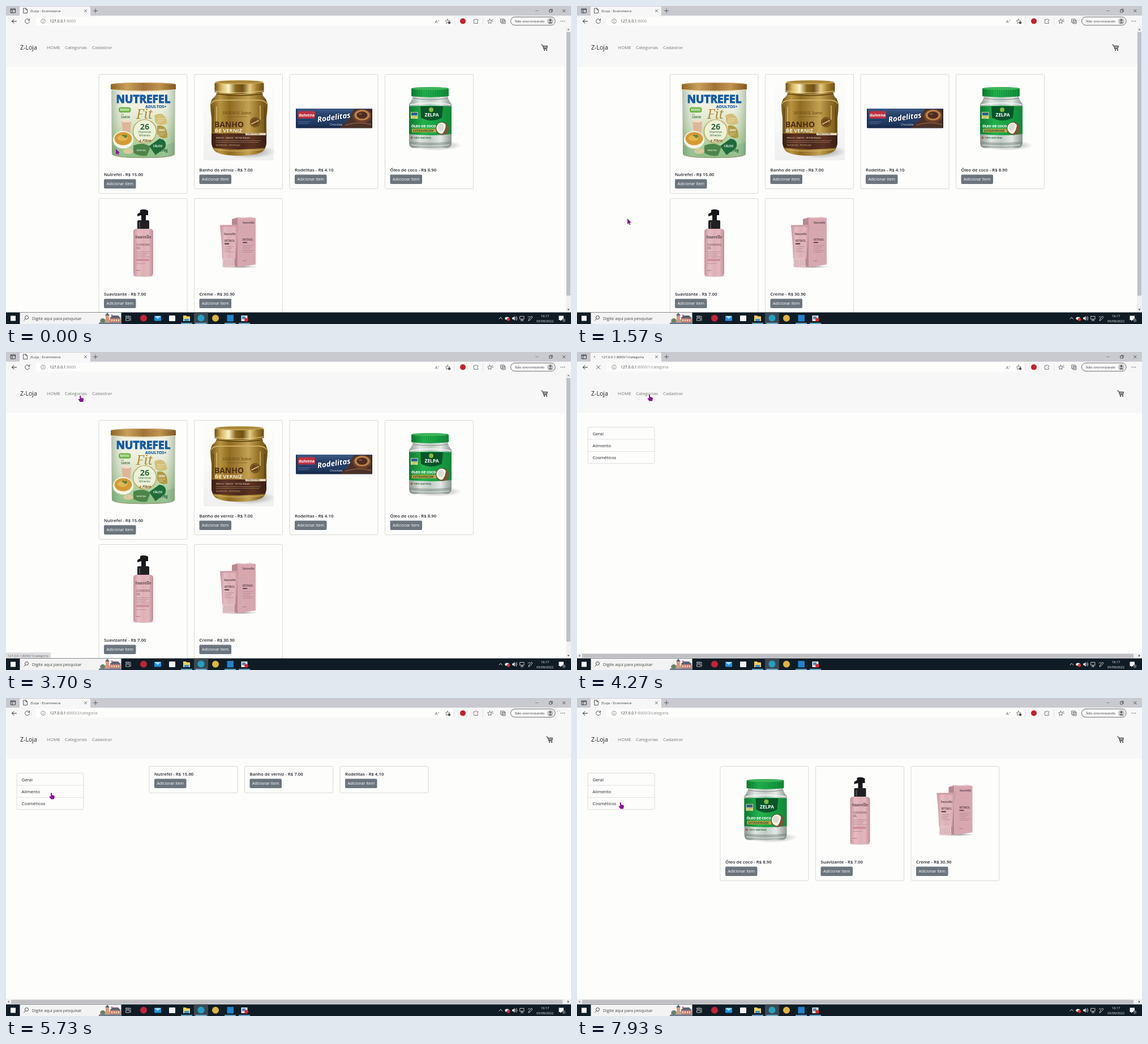
Write an HTML page that moves like this. It is 998 by 561 pixels and loops after 8 s.

```html
<!DOCTYPE html>
<html lang="pt-BR">
<head>
<meta charset="utf-8">
<title>Z-Loja</title>
<style>
html, body { margin: 0; width: 100%; height: 100%; overflow: hidden; background: #fdfdfc; }
svg { display: block; width: 998px; height: 561px; }
text { font-family: 'Open Sans', 'Noto Sans', sans-serif; }
.serif { font-family: 'Noto Serif', serif; }
</style>
</head>
<body>
<svg id="stage" viewBox="0 0 998 561"></svg>
<script>
const stage = document.getElementById('stage');

// Markup helpers
const rect = (x, y, w, h, fill, more = '') => `<rect x="${x}" y="${y}" width="${w}" height="${h}" fill="${fill}" ${more}/>`;
const circle = (x, y, r, fill, more = '') => `<circle cx="${x}" cy="${y}" r="${r}" fill="${fill}" ${more}/>`;
const oval = (x, y, rx, ry, fill, more = '') => `<ellipse cx="${x}" cy="${y}" rx="${rx}" ry="${ry}" fill="${fill}" ${more}/>`;
const shape = (d, fill, more = '') => `<path d="${d}" fill="${fill}" ${more}/>`;
const line = (d, color = '#333', w = 0.8) => `<path d="${d}" fill="none" stroke="${color}" stroke-width="${w}" stroke-linecap="round" stroke-linejoin="round"/>`;
const text = (x, y, s, size, fill = '#212529', more = '') => `<text x="${x}" y="${y}" font-size="${size}" fill="${fill}" ${more}>${s}</text>`;
const group = (content, more = '') => `<g ${more}>${content}</g>`;
const move = (x, y) => `transform="translate(${x} ${y})"`;
const bold = 'font-weight="700"';
const semi = 'font-weight="600"';
const mid = 'text-anchor="middle"';
const serif = 'class="serif"';

function gradient(id, colors, vertical) {
  const stops = colors.map((c, i) => `<stop offset="${i / (colors.length - 1)}" stop-color="${c}"/>`).join('');
  return `<linearGradient id="${id}" x2="${vertical ? 0 : 1}" y2="${vertical ? 1 : 0}">${stops}</linearGradient>`;
}

const defs = `<defs>
  ${gradient('lid', ['#8f6426', '#c9a05a', '#a0733a', '#c09350', '#81581f'])}
  ${gradient('label', ['#f3f2e6', '#f1f1e2', '#dbe6c8', '#b4d3a2', '#9cc78f'], true)}
  ${gradient('round', ['#4f7a5566', '#ffffff00', '#ffffff00', '#ffffff00', '#4f7a5566'])}
  ${gradient('gold', ['#6f5315', '#b8933f', '#8f6c22', '#a8843a', '#c3a253', '#977428', '#6a4d14'])}
  ${gradient('shine', ['#6b4d14', '#d9bb66', '#fbf2c4', '#8a671d', '#6f5016', '#e6cd86', '#a17c2c', '#6b4d14'])}
  ${gradient('band', ['#3c1f14', '#5e3423', '#4a281b', '#5b3221', '#381d13'])}
  ${gradient('backdrop', ['#fdfdfc', '#f9f9f9', '#efefef'], true)}
  ${gradient('glass', ['#8d9893', '#dfe5e1', '#c2cbc6', '#e4e9e5', '#8b9690'])}
  ${gradient('leaf', ['#0c7a30', '#22b04c', '#17a043', '#0f8a38'])}
  ${gradient('pink', ['#c9939c', '#e6bcc2', '#ddb0b7', '#e2b7bd', '#c48d97'])}
  ${gradient('roll', ['#3d5a86', '#274269', '#243d66', '#152849'], true)}
  <radialGradient id="soft"><stop stop-color="#555" stop-opacity=".7"/><stop offset="1" stop-color="#777" stop-opacity="0"/></radialGradient>
</defs>`;

// Thin strokes standing for unreadable label copy
const copy = (x, y, n, w, color, gap = 3) =>
  Array.from({ length: n }, (_, i) => rect(x, y + i * gap, w - (i % 3) * 3, 0.8, color, 'opacity=".55"')).join('');

function can() {
  const body = 'M186 146H299L298 260Q296 268 243 268T187 260Z';
  return shape(body, 'url(#label)')
    + shape('M187 245Q215 254 243 252T298 240V260Q296 268 243 268T187 260Z', '#86b982', 'opacity=".6"')
    + shape(body, 'url(#round)')
    + line('M187.5 261Q190 267.5 243 267.5T297.5 261', '#9a9a78', 1.3)
    + shape('M185 139Q186 135 243 135T300 139V147Q243 152 185 147Z', 'url(#lid)')
    + line('M186 137.5Q243 133.5 299 137.5', '#d8b778') + line('M186 148Q243 153 299 148', '#e9d9ac', 1.2)
    + text(242.5, 170.5, 'NUTREFEL', 19, '#135ba5', `${bold} ${mid} stroke="#135ba5" stroke-width="1.1"`)
    + text(246, 180, 'ADULTOS+', 7.2, '#135ba5', `${bold} stroke="#135ba5" stroke-width=".2"`)
    + rect(199, 178.5, 21.5, 9.5, '#70b548', 'rx="4"') + text(209.7, 185.3, 'NOVO', 5.4, '#fff', `${bold} ${mid}`)
    + text(203, 193, 'EM', 3.6, '#69806a') + text(203, 198, 'SABOR', 4.8, '#4e7355', bold)
    + text(230, 199, 'Fit', 23, '#b58b36', `${serif} font-style="italic"`)
    + shape('M204 203H221L219 229H207Z', '#dfb59a') + oval(212.5, 203, 8.5, 2.3, '#f1ddc7')
    + shape('M262 193Q281 183 285 207Q273 213 264 206Z', '#d3c078')
    + copy(267, 198, 3, 14, '#fff')
    + shape('M267 211Q286 208 285 232Q275 236 267 226Z', '#b39a45')
    + text(275, 221, 'ZERO', 4.4, '#fff', `${bold} ${mid}`) + copy(269, 224, 2, 12, '#fff')
    + shape('M253 247L271 234Q286 236 281 250L264 263Z', '#1f6b3a')
    + text(268, 249, 'CÁLCIO', 4.5, '#fff', `${bold} ${mid}`)
    + shape('M225 246Q244 239 255 249L249 264Q235 266 225 259Z', '#4c8449')
    + text(239, 256, 'MINERAL', 4, '#fff', mid)
    + oval(207, 236, 18, 15.5, '#f8f5e8') + oval(207, 234, 15.5, 11.5, '#d59a35') + oval(206, 233, 9, 5, '#e3b555')
    + circle(211, 230, 2.8, '#4e8d37') + circle(207, 228.5, 1.6, '#3f7a2e') + oval(216, 256, 9, 5, '#d9ca9c')
    + circle(245, 221, 20.5, '#edf1d8', 'stroke="#b89a45" stroke-width="1.2"')
    + text(245, 217.5, '26', 14.5, '#27673d', `${bold} ${mid}`)
    + text(245, 224, 'Vitaminas', 5, '#27673d', mid) + text(245, 230, 'Minerais', 5, '#27673d', mid)
    + text(246, 240, 'e Fibra', 6.4, '#765723', `${bold} ${mid} font-style="italic"`)
    + text(271, 257, '370g', 6.4, '#245f39', bold);
}

function jar() {
  return rect(349, 121, 124, 151, 'url(#backdrop)')
    + oval(430, 257, 46, 12, 'url(#soft)')
    + shape('M373 152H452Q453 159 459 164L462 173Q462 185 460 198V238Q460 251 454 256Q443 264 411 264T369 256Q363 250 363 238V198Q361 185 361 173L364 164Q371 159 373 152Z', 'url(#gold)')
    + line('M362 173Q366 166 376 166H446Q457 166 461 173', '#d8bc74', 1.3)
    + line('M366 180V222M457 180V222', '#5e4412', 1.6)
    + line('M372 178V222M449 176V200', '#dcc17b', 1.4)
    + shape('M368.5 136Q411 129 455.5 136V152Q411 158 368.5 152Z', 'url(#shine)')
    + oval(412, 134.5, 43, 3.6, '#c0a052') + oval(412, 133.8, 38, 2.2, '#a98535')
    + line('M369 150Q411 156 455 150', '#f0deA0', 0.9) + line('M372 155Q412 161 453 155', '#5a4110', 1.6)
    + text(408, 191, 'DORAVE lume', 7.6, '#6b4c18', `${serif} ${mid}`)
    + copy(391, 195, 1, 35, '#644312')
    + circle(440, 205, 9, '#6b461b') + circle(440, 205, 7, 'none', 'stroke="#b58f45" stroke-width=".6"') + line('M434 208L446 202', '#dfc787', 1.5)
    + text(368, 214, 'BANHO', 14, '#4d2d16', bold)
    + text(368.5, 223.3, 'DE VERNIZ', 9.4, '#f5edda', bold)
    + shape('M363 225H460V240Q460 246 457 250Q411 256 366 250Q363 246 363 240Z', 'url(#band)')
    + rect(423, 224, 36, 4, '#e4d7b7') + text(425, 227.3, 'UMA COR VIVA', 3.3, '#55351e')
    + text(371, 234, 'BRILHO · MACIEZ · RESTAURAÇÃO', 3.9, '#eedfc0')
    + copy(370, 237, 2, 80, '#cbb38d') + text(371, 247, 'NUTRITIVO · PROTEÇÃO', 3.9, '#cbb38d')
    + line('M368 253Q411 259 455 253', '#d4b66b', 1.2);
}

function roll() {
  return rect(512, 181, 135, 34.5, 'url(#roll)', 'rx="3"')
    + shape('M589 215L604 203L614 182H644Q647 182 647 185V212Q647 215 643 215Z', '#4a3029')
    + oval(629, 194, 16.5, 12, '#6b4026') + oval(629, 192.5, 13.5, 9.5, '#b9804b') + oval(629, 192.5, 9.5, 6.3, '#4c2b20')
    + oval(626, 190.5, 3, 1.5, '#7d5037')
    + line('M600 210Q622 203 645 209', '#7d5138', 2)
    + rect(516, 185.5, 30, 13, '#bf3342', 'rx="3"')
    + text(531, 194.5, 'dulvena', 7, '#fff', `${bold} ${mid}`)
    + text(550.5, 205, 'Rodelitas', 13.4, '#fff', `${bold} font-style="italic" transform="rotate(-8 550.5 205)" stroke="#1a2f55" stroke-width="2" paint-order="stroke"`)
    + text(572, 210.5, 'Chocolate', 4.8, '#e3e1e4') + copy(516, 204, 2, 21, '#9fb1d1')
    + rect(512, 181, 2, 34.5, '#1a2f55', 'rx="1"') + rect(645, 181, 2, 34.5, '#37281f', 'rx="1"');
}

function coconut() {
  return oval(760, 246, 46, 9, 'url(#soft)')
    + shape('M719 158H780Q781 166 787 173V242Q786 251 777 251H722Q712 251 712 242V173Q718 166 719 158Z', 'url(#glass)')
    + line('M714 174Q749 168 785 174', '#f8fbf9', 1.3) + line('M720 163Q749 167 780 163', '#808c86', 1.2)
    + shape('M716 146Q717 143 749 143T782 146V159Q749 163 716 159Z', 'url(#leaf)')
    + Array.from({ length: 16 }, (_, i) => rect(718 + i * 4, 148, 0.8, 12, '#0b6c2d', 'opacity=".4"')).join('')
    + oval(749, 145.8, 31, 2.4, '#3eb65a')
    + shape('M712 177Q749 174 787 177V226Q749 230 712 226Z', 'url(#leaf)')
    + shape('M732 177H772L770 197Q751 207 733 197Z', '#08552a')
    + circle(751, 183, 4, '#86b83e')
    + text(752, 195, 'ZELPA', 8.4, '#fff', `${bold} ${mid}`)
    + rect(715, 187, 12.5, 12, '#d9d67c') + rect(716, 188, 10.5, 5, '#285f95') + copy(717, 194.5, 2, 9, '#426a3c')
    + text(716, 213.5, 'ÓLEO DE COCO', 5.9, '#fff', `${bold} stroke="#fff" stroke-width=".25"`)
    + rect(717, 216.5, 43, 6.5, '#b9a843') + text(719, 221.8, 'EXTRAVIRGEM', 5.2, '#28533a', bold)
    + circle(770.5, 216, 11.5, '#6d4b30') + oval(769.5, 215.5, 9.3, 10, '#f4f3e9') + oval(768, 214, 5.5, 6.3, '#dcded3')
    + shape('M777 207Q785 213 780 225Q775 228 769 227Q777 220 777 207Z', '#7a5438')
    + text(720, 233.8, '100% NATURAL', 4.2, '#326f40', bold) + circle(716.5, 232.3, 2, '#b05a3c')
    + shape('M713 239Q749 243 786 239V243Q785 250 777 250H722Q713 250 713 243Z', '#6f7d76', 'opacity=".45"')
    + line('M716 245Q749 249 783 245', '#e9eeeb', 1.1);
}

function pump() {
  return oval(243, 476, 22, 2.5, 'url(#soft)')
    + shape('M237 360Q244 357 251 361V369H247V380H239V369L232 371V367L237 364Z', '#171719')
    + rect(232, 378, 21, 16, '#202022', 'rx="2"') + rect(235, 381, 2, 11, '#545457')
    + shape('M225 397Q226 393 231 393H253Q259 393 260 397V472Q259 477 254 477H230Q225 477 225 472Z', 'url(#pink)')
    + text(242.5, 410, 'Suavelle', 6.6, '#54414a', `${serif} ${semi} ${mid}`)
    + text(230, 423, 'CLEANSING', 4.6, '#5d474f') + text(230, 429, 'OIL', 4.6, '#5d474f')
    + copy(230, 433, 4, 24, '#8b6b74') + rect(230, 446, 23, 4, '#cf8f9c') + copy(230, 454, 1, 17, '#8b6b74')
    + copy(230, 466, 1, 7, '#4d343d');
}

function cream() {
  return oval(413, 460, 33, 2.5, 'url(#soft)')
    + shape('M399 376L409 373V461L399 456Z', '#b98791')
    + shape('M409 373L441 374V456L409 461Z', '#d7a7b0')
    + shape('M399 376L431 372L441 374L409 375Z', '#e6bfc6')
    + text(418, 384, 'Suavelle', 4.8, '#5d464f', `${serif} ${semi}`)
    + text(418, 414, 'RETINOL', 4.5, '#503540', semi) + rect(418, 416.5, 8, 1.6, '#493239')
    + copy(418, 422, 5, 19, '#8f6c75') + copy(418, 449, 1, 6, '#5c3d48')
    + shape('M378 387L411 386Q407 418 405 446H382Q381 416 378 387Z', 'url(#pink)')
    + rect(378, 386.5, 33, 3, '#d09ca5') + rect(382.5, 445, 21, 16, '#e3c2c7', 'rx="2"')
    + Array.from({ length: 6 }, (_, i) => rect(385 + i * 3, 447, 0.6, 12, '#bd949b')).join('')
    + text(385, 404, 'Suavelle', 4.8, '#54414a', `${serif} ${semi}`)
    + text(386, 416, 'RETINOL', 4.4, '#503540', semi) + rect(386, 418.5, 8, 2, '#493239')
    + copy(386, 424, 4, 16, '#8f6c75');
}

const items = [
  { name: 'Nutrefel', price: '15.60', at: [164, 120.5], h: 210, art: can },
  { name: 'Banho de verniz', price: '7.00', at: [332.5, 120.5], h: 202, art: jar },
  { name: 'Rodelitas', price: '4.10', at: [501, 120.5], h: 202, art: roll },
  { name: 'Óleo de coco', price: '8.90', at: [669.5, 120.5], h: 202, art: coconut },
  { name: 'Suavizante', price: '7.00', at: [164, 339.5], h: 202, art: pump },
  { name: 'Creme', price: '30.90', at: [332.5, 339.5], h: 202, art: cream },
];

function card(item, x, y, loaded = true) {
  const h = loaded ? item.h : 47;
  const art = loaded ? group(item.art(), move(-item.at[0], -item.at[1])) : '';
  return group(rect(0, 0, 156, h, '#fdfdfc', 'rx="2.5" stroke="#d4d4d4" stroke-width=".9"') + art
    + text(9, h - 30.7, `${item.name} - R$ ${item.price}`, 7.8, '#212529', semi)
    + rect(9, h - 25, 56.5, 16.5, '#6c757d', 'rx="2"')
    + text(37.3, h - 14.2, 'Adicionar item', 7, '#fff', mid), move(x, y));
}

const row = (from, loaded) => items.slice(from, from + 3).map((it, i) => card(it, 253 + i * 168.5, 120.5, loaded)).join('');

function cart(x) {
  return group(line('M-5.5 -5H-3.5L-1 2.5H4.5M-3 -3H5.5L4.5 1H-1.5', '#222', 0.9)
    + line('M-.7 -3V1M1.5 -3V1M3.6 -3V1M-2.2 -1H5', '#333', 0.5)
    + circle(0, 4.6, 1, '#222') + circle(4, 4.6, 1, '#222'), move(x, 73.5));
}

const vScroll = rect(989, 37, 9, 504, '#f1f1f2') + rect(990, 46, 7, 465, '#bfc0ca')
  + shape('M991.5 42.5L993.5 40L995.5 42.5Z', '#777') + shape('M991.5 534.5L993.5 537L995.5 534.5Z', '#444');
const hScroll = rect(0, 531, 998, 10, '#f1f1f2') + rect(9, 532.5, 974, 7, '#c0c0c4')
  + shape('M5.5 533.5L3 535.7L5.5 538Z', '#777') + shape('M992 533.5L994.5 535.7L992 538Z', '#444');

const sidebar = rect(19, 132.5, 118, 64.3, '#fdfdfc', 'rx="2.5" stroke="#d8d8d8" stroke-width=".9"')
  + rect(19.5, 133, 117, 21, '#f5f5f5', 'id="hover" visibility="hidden"')
  + line('M19 154H137M19 175.5H137', '#dedede')
  + ['Geral', 'Alimento', 'Cosméticos'].map((s, i) => text(27.5, 146.5 + i * 21.4, s, 7.8)).join('');

const navbar = rect(0, 37, 998, 70.5, '#f7f7f7') + text(25, 76.5, 'Z-Loja', 10.6, '#222')
  + text(72, 75.5, 'HOME', 8, '#777') + text(104, 75.5, 'Categorias', 7.9, '#777') + text(152, 75.5, 'Cadastrar', 7.8, '#777');

const star = 'M0 -4L1.2 -1.3L4 -1L1.9 .9L2.5 3.8L0 2.3L-2.5 3.8L-1.9 .9L-4 -1L-1.2 -1.3Z';
const browser = rect(0, 0, 998, 18, '#c9cad0') + rect(0, 17, 998, 20, '#f7f7f7')
  + shape('M24 17V3Q24 1 27 1H146Q149 1 149 3V17Z', '#f7f7f7')
  + line('M8.5 4.8H16.5V12H8.5ZM8.5 6.5H16.5M11 6.5V12', '#222')
  + group(line('M31 4H35L37.5 6.5V12.5H31ZM35 4V6.5H37.5', '#333'), 'id="doc"')
  + circle(31, 8.5, 0.9, '#666', 'id="spinner"')
  + text(43, 10.6, '', 6.05, '#333', 'id="tab"')
  + line('M138.5 6.5L142.5 10.5M142.5 6.5L138.5 10.5') + line('M154.5 8.5H161.5M158 5V12', '#444')
  + line('M935.5 8.5H940', '#777') + line('M960 7H964V11H960ZM961.3 7V5.7H965.2V9.6H964', '#333', 0.7)
  + line('M983.5 6.3L988 10.8M988 6.3L983.5 10.8')
  + line('M10.5 27H18.5M14 23.5L10.5 27L14 30.5', '#222', 1)
  + group(line('M41 24.5A4 4 0 1 0 41.6 27.7M41.5 22.7V25.3H39', '#333'), 'id="reload"')
  + group(line('M34.5 23.5L41 30M41 23.5L34.5 30'), 'id="stop"')
  + rect(52, 19, 738, 15.5, '#fdfdfc', 'rx="2.5"')
  + circle(65.5, 26.8, 3.8, 'none', 'stroke="#777" stroke-width=".8"') + line('M65.5 26.3V28.6M65.5 24.9V25', '#777')
  + text(77, 29.2, '<tspan fill="#333">127.0.0.1</tspan><tspan id="path"></tspan>', 6.8, '#888')
  + text(757.5, 30, 'A', 8, '#666') + text(763, 27, '»', 5, '#666')
  + group(line(star, '#555', 0.7), move(780, 27)) + circle(783, 29.5, 2.3, '#555')
  + rect(791.5, 20, 0.8, 14, '#ddd') + circle(807, 26.7, 5, '#c9202d')
  + line('M826.5 24H829Q830.5 21.5 832 24H833.5V26Q831 27.5 833.5 29V30.5H826.5V28.5Q824.5 27 826.5 26Z', '#444', 0.7)
  + rect(842, 20, 0.8, 14, '#ddd')
  + group(line(star + 'M3.5 -3H5.5M4.5 0H6', '#444', 0.7), move(854.5, 27))
  + line('M874 23H880V29H874ZM876 29V31H882V25H880M877 24.5V27.5M875.5 26H878.5', '#333', 0.7)
  + rect(891.5, 19.3, 78.5, 14.6, '#fafafa', 'rx="7.3" stroke="#444" stroke-width=".8"')
  + text(899, 29, 'Não sincronizando', 6, '#333')
  + circle(961.5, 26.6, 5.7, '#c8c8ca') + circle(961.5, 25, 2, '#68686c') + shape('M957.8 30.5Q961.5 25.5 965.2 30.5Z', '#68686c')
  + [980.5, 983.5, 986.5].map(x => circle(x, 26.8, 0.7, '#333')).join('');

const running = x => rect(x - 10, 559, 20, 1.6, '#7cc4ee');
const taskbar = rect(0, 540.5, 998, 20.5, '#101c25')
  + rect(8, 546.5, 9, 9, '#f4f7f9')
  + rect(24.5, 541, 179, 20, '#f3f3f3')
  + circle(36.5, 549.5, 3, 'none', 'stroke="#333" stroke-width=".9"') + line('M34.3 551.8L31.5 555')
  + text(46, 553.6, 'Digite aqui para pesquisar', 7.2, '#444')
  + rect(166, 553, 37, 8, '#b8a5a0') + rect(176, 545, 6, 15, '#d59b78') + shape('M175 546L179 541L183 546Z', '#536675')
  + rect(184, 550, 18, 9, '#c58178') + shape('M183 551L188 546H198L203 551Z', '#5d6372')
  + [186, 190, 194, 198].map(x => rect(x, 553, 2, 3, '#f4dfac')).join('')
  + circle(171, 555, 4, '#658365') + rect(164, 558.5, 39, 2.5, '#697a90') + circle(187, 545.5, 1.5, '#d76798')
  + line('M212 547H218V549H212ZM212 551H218V555H212ZM220 547V555', '#e5e7e9')
  + circle(243, 550.7, 6, '#c42338')
  + rect(262, 546.5, 12, 9, '#2292df', 'rx="1"') + shape('M262 547L268 552L274 547Z', '#a7ddf8')
  + rect(288, 546, 11, 10, '#f3f4f5', 'rx="1"')
  + shape('M313 546H318L319.5 547.5H325V556H313Z', '#f4cf60') + rect(315, 552, 8, 4, '#3d91cd')
  + rect(332, 540.5, 25, 20.5, '#3b4951') + circle(344.5, 550.5, 6, '#269fc5')
  + circle(370, 550.7, 6, '#dfb63d') + rect(390.5, 545, 11.5, 11.5, '#2084cc')
  + rect(415.5, 546, 11, 10, '#eceff1') + rect(417, 547.5, 6, 5, '#4d88b7') + circle(424.5, 553.5, 3.3, '#e4232d')
  + [319, 344.5, 396, 421].map(running).join('')
  + line('M871 552L873.7 549.3L876.4 552', '#eee', 1)
  + oval(885, 551, 3.8, 2.6, '#e8e8e8') + circle(887.5, 553, 2.7, '#d92d36')
  + shape('M894 549.5H896L898.5 547V555L896 552.5H894Z', '#eee') + line('M900 549Q901.5 551 900 553M901.7 547.5Q904 551 901.7 554.5', '#eee')
  + line('M908 547.5H915V552.5H908ZM911.5 552.5V555M909 555H914', '#eee')
  + line('M923 555L924 552L928 547L930 549L926 553.5ZM922 549Q923 547 925 548', '#eee')
  + text(952, 548.5, '16:17', 5.7, '#f3f3f3', mid) + text(952, 557.7, '05/09/2022', 5.7, '#f3f3f3', mid)
  + shape('M976.5 546.5H985V554H981L979 556V554H976.5Z', '#f2f2f2') + circle(985.5, 554.5, 3.2, '#47525a')
  + text(985.5, 556.3, '1', 4.8, '#fff', mid);

const status = group(rect(0, 530, 79, 10.5, '#dedee0') + text(3, 537.5, '', 5.8, '#666', 'id="link"'), 'id="status"');
const pointer = group(
  group(shape('M0 0V10L2.4 8L4 11.3L5.6 10.5L4 7.4L7 7.1Z', '#8b119c'), 'id="arrow"')
  + group(shape('M-1 .8Q0 -.6 1 .8V4L5 5.2Q6.2 5.7 5.9 7L5 11.5H-.5L-3.3 7.5Q-3.8 6.2 -2.5 6.2L-1 7Z', '#8b119c'), 'id="hand"'), 'id="pointer"');

stage.innerHTML = defs + rect(0, 0, 998, 561, '#fdfdfc') + navbar
  + group(items.map(it => card(it, ...it.at)).join('') + vScroll + cart(951), 'id="home"')
  + group(sidebar + cart(960) + hScroll, 'id="category"')
  + group(row(0, false), 'id="food0"') + group(row(0, true), 'id="food1"')
  + group(row(3, false), 'id="care0"') + group(row(3, true), 'id="care1"')
  + browser + status + taskbar + pointer;

const el = {};
stage.querySelectorAll('[id]').forEach(n => el[n.id] = n);
const show = (id, on) => el[id].style.display = on ? '' : 'none';

// Pointer stops: time, x, y
const stops = [
  [0, 194, 252], [1500, 89, 375], [1650, 89, 375], [2870, 490, 248], [3750, 128, 75],
  [4450, 128, 75], [5150, 80, 167], [6000, 80, 167], [6500, 77, 184], [8000, 77, 184],
];
const loads = [0, 4200, 5650, 7150]; // when each page appears
const inside = ([x, y], l, t, r, b) => x >= l && x <= r && y >= t && y <= b;

function pointerAt(t) {
  const i = Math.max(1, stops.findIndex(s => s[0] > t));
  const [t0, x0, y0] = stops[i - 1], [t1, x1, y1] = stops[i];
  const u = (t - t0) / (t1 - t0), e = u * u * (3 - 2 * u);
  return [x0 + (x1 - x0) * e, y0 + (y1 - y0) * e];
}

function draw(t) {
  const page = loads.filter(l => t >= l).length - 1;
  const p = pointerAt(t);
  const start = pointerAt(loads[page]);
  const moved = Math.hypot(p[0] - start[0], p[1] - start[1]) > 0.5;
  const overNav = inside(p, 104, 66, 144, 79);
  const overList = page > 0 && inside(p, 19, 132.5, 137, 196.8);
  const entry = Math.min(2, Math.floor((p[1] - 132.5) / 21.4));
  const loading = page === 1 && t < 4420;
  const path = page ? `:8000/${page}/categoria` : ':8000';

  show('home', page === 0);
  show('category', page > 0);
  show('food0', page === 2 && t < 5830);
  show('food1', page === 2 && t >= 5830);
  show('care0', page === 3 && t < 7300);
  show('care1', page === 3 && t >= 7300);

  show('doc', !loading);
  show('reload', !loading);
  show('spinner', loading);
  show('stop', loading);
  el.tab.textContent = loading ? '127.0.0.1' + path : 'ZLoja - Ecommerce';
  el.path.textContent = path;

  show('status', moved && (overNav || overList));
  el.link.textContent = `127.0.0.1:8000/${overList ? entry + 1 : 1}/categoria`;
  el.hover.setAttribute('visibility', moved && overList ? 'inherit' : 'hidden');
  el.hover.setAttribute('y', 133 + entry * 21.4);

  show('hand', overNav || overList);
  show('arrow', !(overNav || overList));
  el.pointer.setAttribute('transform', `translate(${p[0]} ${p[1]})`);
}

const begin = performance.now();
function tick(now) {
  draw(Math.max(0, now - begin) % 8000);
  requestAnimationFrame(tick);
}
draw(0);
requestAnimationFrame(tick);
</script>
</body>
</html>
```
